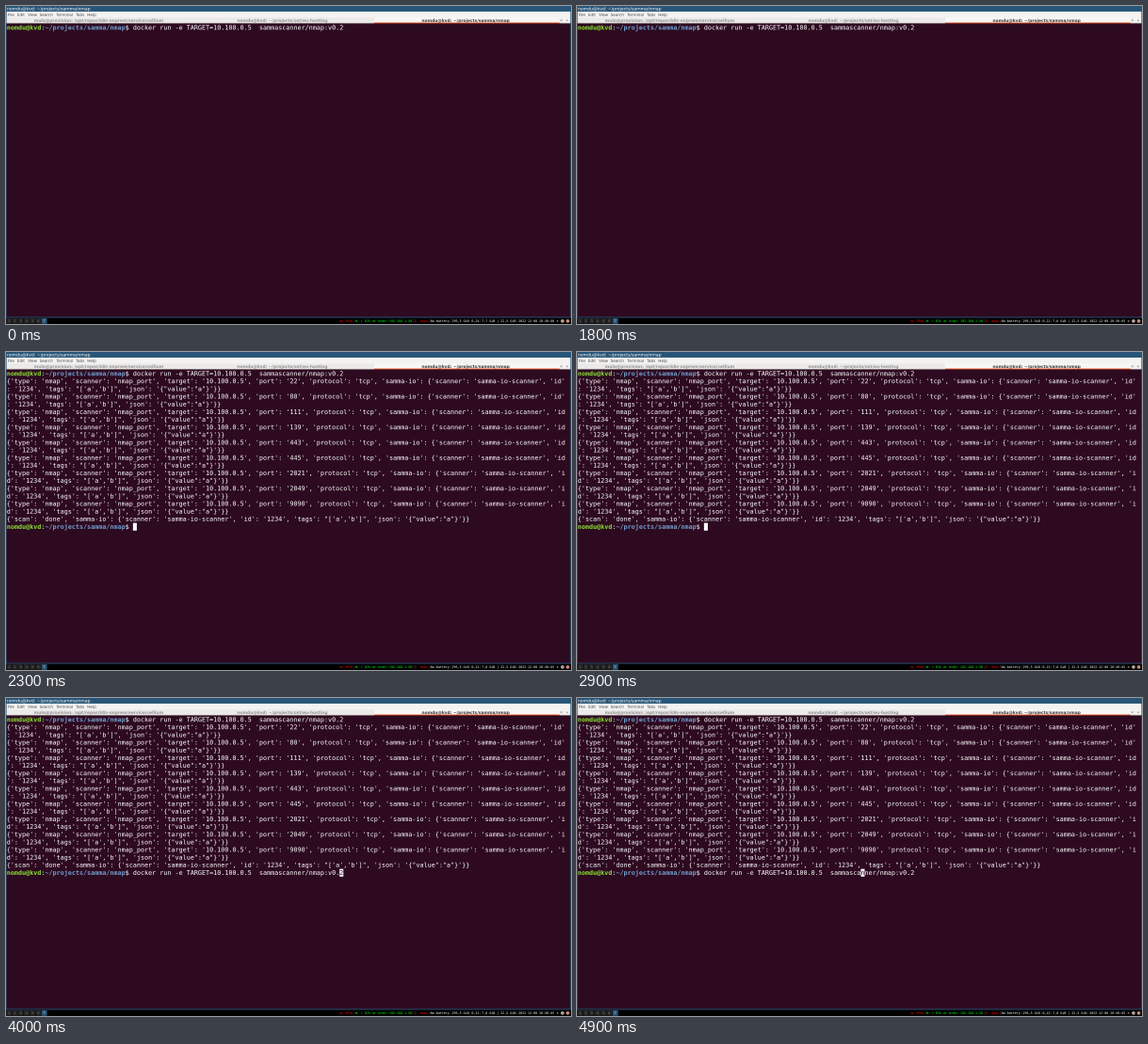
These frames come from a looping animation (600 by 338 pixels, 5000 ms). An HTML page with a canvas:

```html
<!DOCTYPE html>
<html lang="en">
<head>
<meta charset="utf-8">
<title>Terminal scan</title>
<style>
html, body { margin: 0; width: 600px; height: 338px; overflow: hidden; background: #000; }
canvas { display: block; }
</style>
</head>
<body>
<canvas id="stage" width="600" height="338"></canvas>
<script>
const LOOP = 5000, STEP = 100;
const DESK_W = 1920, DESK_H = 1080;
const CELL_W = 13, CELL_H = 26, TERM_X = 2.5, TERM_Y = 60.5, COLUMNS = 146;
const MONO = '"DejaVu Sans Mono", monospace', SANS = '"DejaVu Sans", sans-serif';
const BLUE = '#285577', TERM_BG = '#2d0a20', WHITE = '#ffffff';

const USER = 'nomdu@kvd', PATH = '~/projects/samma/nmap', NETWORK = 'kvdn';
const TITLE = `${USER}: ${PATH}`;
const COMMAND = 'docker run -e TARGET=10.100.0.5  sammascanner/nmap:v0.2';
const PROMPT_LENGTH = USER.length + PATH.length + 3;
const LINE_END = PROMPT_LENGTH + COMMAND.length;
const PORTS = [22, 80, 111, 139, 443, 445, 2021, 2049, 9090];

const META = `'samma-io': {'scanner': 'samma-io-scanner', 'id': '1234', ` +
  `'tags': "['a','b']", 'json': '{"value":"a"}'}}`;
const OUTPUT = PORTS.map(port =>
  `{'type': 'nmap', 'scanner': 'nmap_port', 'target': '10.100.0.5', ` +
  `'port': '${port}', 'protocol': 'tcp', ${META}`
).concat(`{'scan': 'done', ${META}`).flatMap(wrap);
const LAST_ROW = OUTPUT.length + 1;

function wrap(line) {
  const rows = [];
  for (let i = 0; i < line.length; i += COLUMNS) rows.push(line.slice(i, i + COLUMNS));
  return rows;
}

function makeCanvas(width, height) {
  const canvas = document.createElement('canvas');
  canvas.width = width;
  canvas.height = height;
  return canvas;
}

// Drawn at four times the size and halved twice, so small text stays even.
const stage = document.getElementById('stage');
const large = makeCanvas(2400, 1352), medium = makeCanvas(1200, 676);
const ctx = large.getContext('2d');
ctx.scale(large.width / DESK_W, large.height / DESK_H);

function rect(x, y, w, h, color) {
  ctx.fillStyle = color;
  ctx.fillRect(x, y, w, h);
}

function label(text, x, y, font, color, align = 'left') {
  ctx.font = font;
  ctx.fillStyle = color;
  ctx.textAlign = align;
  ctx.fillText(text, x, y);
}

function cells(text, column, row, color = WHITE, weight = 'normal') {
  ctx.font = `${weight} 21.33px ${MONO}`;
  ctx.fillStyle = color;
  ctx.textAlign = 'left';
  const y = TERM_Y + row * CELL_H + 20;
  [...text].forEach((char, i) => {
    if (char !== ' ') ctx.fillText(char, TERM_X + (column + i) * CELL_W, y);
  });
}

function prompt(row) {
  cells(USER, 0, row, '#8ae234', 'bold');
  cells(':', USER.length, row);
  cells(PATH, USER.length + 1, row, '#729fcf', 'bold');
  cells('$', PROMPT_LENGTH - 2, row);
}

function cursorAt(t) {
  if (t < 500) return null;
  if (t < 1100) return { column: LINE_END, row: 0 };
  if (t < 1700) return { column: 0, row: 1 };
  if (t < 2300) return null;
  if (t < 3000) return { column: PROMPT_LENGTH, row: LAST_ROW };
  if (t < 3500) return null;
  if (t < 3800) return { column: LINE_END, row: LAST_ROW };
  const repeats = Math.max(0, Math.floor((t - 4360) / 40));
  return { column: LINE_END - 1 - repeats, row: LAST_ROW };
}

function drawWindowFrame() {
  rect(0, 0, DESK_W, DESK_H, '#000000');
  rect(0, 0, DESK_W, 1059, BLUE);
  label(TITLE, 3, 14, `14.67px ${SANS}`, WHITE);

  rect(2, 19, 1916, 40, '#f4f3f2');
  const menu = { File: 6, Edit: 38, View: 74, Search: 114, Terminal: 171, Tabs: 237, Help: 276 };
  for (const [name, x] of Object.entries(menu)) label(name, x, 34, `13.33px ${SANS}`, '#3d3d3d');

  rect(2, 39, 1249, 19, '#ebeae9');
  rect(1251, 39, 630, 19, '#f7f7f6');
  const tabFont = `bold 14px ${SANS}`;
  label('mulo@provision: /opt/repos/k8s-onprem/service/cellium', 315, 54, tabFont, '#949494', 'center');
  label(`${USER}: ~/projects/ost/eu-hosting`, 939, 54, tabFont, '#949494', 'center');
  label(TITLE, 1562, 54, tabFont, '#3d3d3d', 'center');
  rect(2, 57, 1916, 2, '#cfcbc8');
  rect(1251, 56, 630, 3, '#e95420');
  label('×', 1887, 53, `13px ${SANS}`, '#666666', 'center');
  label('▾', 1907, 53, `11px ${SANS}`, '#666666', 'center');

  rect(2, 59, 1916, 997, TERM_BG);
}

function drawTerminal(t) {
  prompt(0);
  cells(COMMAND, PROMPT_LENGTH, 0);
  if (t >= 1900) OUTPUT.forEach((line, i) => cells(line, 0, i + 1));
  if (t >= 2200) prompt(LAST_ROW);
  if (t >= 3500) cells(COMMAND, PROMPT_LENGTH, LAST_ROW);

  const cursor = cursorAt(t);
  if (!cursor) return;
  const { column, row } = cursor;
  rect(TERM_X + column * CELL_W, TERM_Y + row * CELL_H, CELL_W, CELL_H, WHITE);
  if (t >= 3500) cells(COMMAND[column - PROMPT_LENGTH] || ' ', column, row, TERM_BG);
}

function drawBar(t) {
  const font = `10.67px ${MONO}`, baseline = 1074;
  for (let i = 0; i < 7; i++) {
    const x = 1 + i * 20, active = i === 6;
    rect(x, 1061, 18, 18, active ? '#4c7899' : '#333333');
    rect(x + 1, 1062, 16, 16, active ? BLUE : '#222222');
    label(String(i + 1), x + 9, baseline, font, active ? WHITE : '#888888', 'center');
  }

  const later = t >= 1400;
  const blocks = [
    ['no IPv6', '#ff0000'],
    [`W: ( 63% at ${NETWORK}) 192.168.1.50`, '#00ff00'],
    ['E: down', '#ff0000'],
    ['No battery', WHITE],
    ['295,5 GiB', WHITE],
    [later ? '0,22' : '0,24', WHITE],
    [`${later ? '7,8' : '7,7'} GiB | 22,5 GiB`, WHITE],
    [`2022-12-08 20:30:${later ? 45 : 40}`, WHITE]
  ];
  let x = 1133;
  blocks.forEach(([text, color], i) => {
    if (i) rect(x - 5, 1064, 1, 12, '#666666');
    label(text, x, baseline, font, color);
    x += ctx.measureText(text).width + 9;
  });

  const tray = [[1874, 3, '#777777'], [1891, 6, '#b9a39a'], [1909, 6, '#c98a70']];
  for (const [cx, r, color] of tray) {
    ctx.fillStyle = color;
    ctx.beginPath();
    ctx.arc(cx, 1070, r, 0, Math.PI * 2);
    ctx.fill();
  }
}

function halve(from, to) {
  const target = to.getContext('2d');
  target.imageSmoothingEnabled = true;
  target.drawImage(from, 0, 0, to.width, to.height);
}

function draw(t) {
  drawWindowFrame();
  drawTerminal(t);
  drawBar(t);
  halve(large, medium);
  halve(medium, stage);
}

const start = performance.now();
let shown = -1;

function tick() {
  const elapsed = (performance.now() - start) % LOOP;
  const t = Math.floor(elapsed / STEP) * STEP;
  if (t !== shown) draw(shown = t);
  requestAnimationFrame(tick);
}
tick();
</script>
</body>
</html>
```
